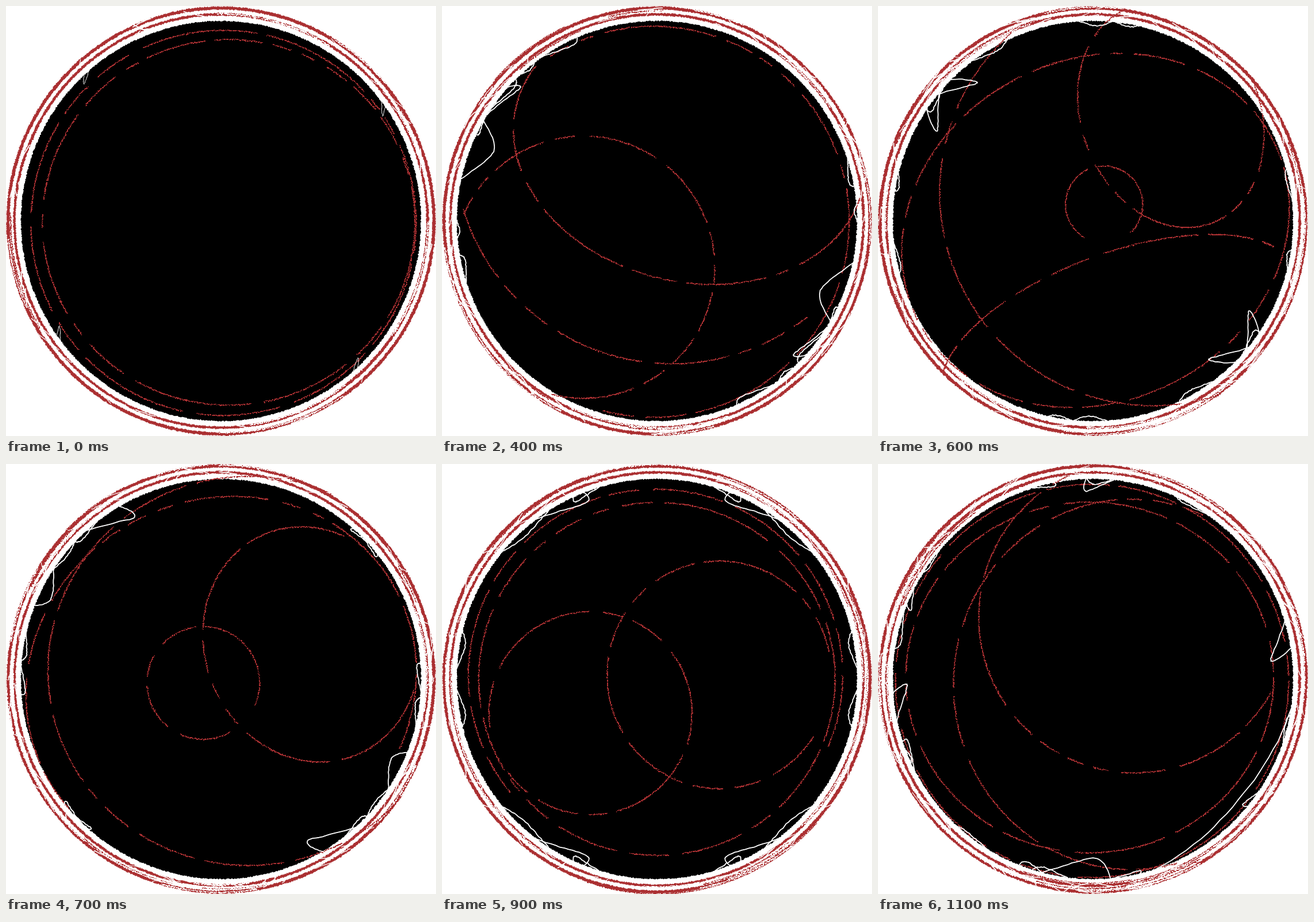
Write an HTML page with a canvas that moves like this. It is 748 px wide and 748 px high and loops after 1200 ms.

```html
<!DOCTYPE html>
<html>
<head>
<meta charset="utf-8">
<style>
html, body { margin: 0; width: 100%; height: 100%; overflow: hidden; background: #fff; }
canvas { display: block; width: 748px; height: 748px; }
</style>
</head>
<body>
<canvas id="c" width="748" height="748"></canvas>
<script>
const ctx = document.getElementById('c').getContext('2d');
const MID = 374, RIM = 348, STEP = 100, COUNT = 12, CARRIED = 4, RAD = Math.PI / 180;
const RED = '#ab3032', WHITE = '#fff';

// Ellipse whose y phase is shifted by skew; angles in degrees.
const ring = (x, y, rx, ry = rx, skew = 0, from = 0, to = 360) => [x, y, rx, ry, skew, from, to];
const circle = (x, y, r, from, to) => ring(x, y, r, r, 0, from, to);
// White outline growing inwards from the rim: angle, half width, depth, lean of the tip.
const petal = (angle, half, depth, lean) => [angle, half, depth, lean];

const scenes = [
  { step: 0, sym: 'turn', wear: 0.3, rings: [
    circle(378, 377, 335), ring(387, 376, 324, 318)
  ], petals: [petal(228, 1, 12, -3), petal(144, 1, 14, 3)] },

  { step: 2, sym: 'turn', wear: 0.8, rings: [
    circle(369, 322, 272), circle(354, 441, 262), ring(365, 397, 338, 312, -2.4)
  ], petals: [petal(222, 9, 7, 0), petal(173, 8, 6, 0)] },

  { step: 4, sym: 'turn', wear: 0.8, rings: [
    ring(430, 246, 306, 238, 7.5, 14, 209), circle(246, 454, 228, 204, 464),
    circle(400, 242, 380, 52, 163), circle(368, 375, 340, 238, 465)
  ], petals: [petal(217, 5, 17, 7), petal(201, 9, 40, 2)] },

  { step: 6, sym: 'turn', wear: 0.8, rings: [
    ring(509, 190, 162, 195, 10, -30, 240), circle(393, 345, 67, 122, 407),
    circle(478, 324, 371, 70, 229), ring(378, 390, 337, 308, -7), ring(420, 570, 310, 173, -31, 189, 330)
  ], petals: [petal(222, 3, 36, 8), petal(217, 3, 36, -7)] },

  { step: 8, sym: 'mirror', wear: 0.7, rings: [
    circle(551, 437, 214, 66, 336), circle(293, 416, 129), ring(366, 395, 328, 306),
    circle(370, 372, 342, 282, 408), circle(-540, 830, 739, 320, 349)
  ], petals: [petal(245, 9, 24, 8), petal(198, 9, 8, 3)] },

  { step: 10, sym: 'flip', wear: 1, rings: [
    ring(413, 296, 176, 182), circle(223, 450, 224, 344, 649), ring(381, 352, 292, 308),
    ring(372, 362, 309, 305), circle(358, 375, 340, 41, 107), circle(436, 338, 312, 24, 83)
  ], petals: [petal(236, 7, 14, 6), petal(259, 9, 14, -5)] },

  { step: 11, sym: 'none', wear: 1, rings: [
    circle(446, 266, 271, 29, 245), ring(440, 383, 309, 322, 0, 75, 295),
    ring(368, 371, 320, 305), circle(372, 377, 342)
  ], petals: [petal(272, 4, 22, -4), petal(347, 4, 38, 7), petal(40, 32, 20, 0), petal(95, 10, 38, -5), petal(172, 4, 26, 6)] }
];

const SYMMETRY = {
  none: [[1, 1]],
  turn: [[1, 1], [-1, -1]],
  flip: [[1, 1], [-1, 1]],
  mirror: [[1, 1], [-1, 1], [1, -1], [-1, -1]]
};

function seeded(n) {
  let s = n * 7919 + 17;
  return () => {
    s = s + 0x6D2B79F5 | 0;
    let t = Math.imul(s ^ s >>> 15, 1 | s);
    t = t + Math.imul(t ^ t >>> 7, 61 | t) ^ t;
    return ((t ^ t >>> 14) >>> 0) / 4294967296;
  };
}

function roughLoop(r, rnd) {
  const n = Math.round(r * 5);
  for (let i = 0; i < n; i++) {
    const a = i / n * 2 * Math.PI, d = r + (rnd() - 0.5) * 2;
    ctx[i ? 'lineTo' : 'moveTo'](MID + d * Math.cos(a), MID + d * Math.sin(a));
  }
  ctx.closePath();
}

function band(r, w, rnd) {
  ctx.beginPath();
  roughLoop(r + w / 2, rnd);
  roughLoop(r - w / 2, rnd);
  ctx.fillStyle = RED;
  ctx.fill('evenodd');
}

// Grainy line made of small dots
function grain([x, y, rx, ry, skew], from, to, color, rnd) {
  const n = Math.ceil((to - from) * RAD * Math.max(rx, ry));
  ctx.fillStyle = color;
  for (let i = 0; i <= n; i++) {
    const t = (from + (to - from) * i / n) * RAD;
    const px = x + rx * Math.cos(t) + (rnd() - 0.5) * 1.6;
    const py = y + ry * Math.sin(t + skew * RAD) + (rnd() - 0.5) * 1.6;
    ctx.fillRect(Math.floor(px), Math.floor(py), rnd() < 0.5 ? 2 : 1, rnd() < 0.5 ? 2 : 1);
  }
}

function dashed(shape, rnd) {
  const [, , rx, ry, , from, to] = shape;
  const degrees = px => px / Math.max(rx, ry) / RAD;
  let a = from;
  while (a < to) {
    const end = Math.min(to, a + degrees(20 + 190 * rnd() ** 1.5));
    grain(shape, a, end, RED, rnd);
    a = end + degrees(16 + 12 * rnd());
  }
}

// Broken lines that run along the double border
function streaks(count, color, rnd) {
  for (let i = 0; i < count; i++) {
    const r = 358 + rnd() * 15, a = rnd() * 360;
    const x = MID + (rnd() - 0.5) * 8, y = MID + (rnd() - 0.5) * 8;
    grain(ring(x, y, r), a, a + 8 + rnd() * 30, color, rnd);
  }
}

function repeated(sym, draw) {
  for (const [sx, sy] of SYMMETRY[sym]) {
    ctx.save();
    ctx.translate(MID, MID);
    ctx.scale(sx, sy);
    ctx.translate(-MID, -MID);
    draw();
    ctx.restore();
  }
}

// Strokes a curve given as t -> [angle, radius], with a slight tremble.
function polar(sym, n, at, rnd) {
  const path = new Path2D();
  for (let i = 0; i <= n; i++) {
    const [a, r] = at(i / n), d = r + (rnd() - 0.5) * 1.6;
    path.lineTo(MID + d * Math.cos(a * RAD), MID + d * Math.sin(a * RAD));
  }
  repeated(sym, () => ctx.stroke(path));
}

function drawPetal(sym, [angle, half, depth, lean], rnd) {
  polar(sym, 24, t => {
    const side = 2 * t - 1, rise = 1 - Math.abs(side) ** 1.7;
    return [angle + half * side + lean * rise, RIM + 1 - depth * rise];
  }, rnd);
}

function scratches(sym, wear, rnd) {
  const n = Math.round(120 * wear / SYMMETRY[sym].length);
  for (let i = 0; i < n; i++) {
    const a = rnd() * 360, len = 1 + rnd() * 6;
    const r0 = 354 + rnd() * 20, r1 = 354 + rnd() * 20;
    ctx.lineWidth = 1 + rnd() * 0.8;
    polar(sym, 5, t => [a + len * t, r0 + (r1 - r0) * t], rnd);
  }
}

function fringe(sym, wear, rnd) {
  const n = Math.round(14 * wear / SYMMETRY[sym].length);
  for (let i = 0; i < n; i++)
    drawPetal(sym, petal(rnd() * 360, 2 + rnd() * 4, 4 + rnd() * 7, rnd() * 8 - 4), rnd);
}

// Shapes that carry over to the next scene move there in a straight line.
const blend = (a, b, k) => a.slice(0, Math.min(b.length, CARRIED))
  .map((shape, i) => shape.map((v, j) => v + (b[i][j] - v) * k));

function pose(step) {
  const at = scenes.findLastIndex(s => s.step <= step);
  const now = scenes[at], next = scenes[at + 1];
  if (now.step === step) return now;
  const k = (step - now.step) / (next.step - now.step);
  return { ...now, rings: blend(now.rings, next.rings, k), petals: blend(now.petals, next.petals, k) };
}

function paint(step) {
  const rnd = seeded(step + 1);
  const { sym, wear, rings, petals } = pose(step);

  ctx.fillStyle = WHITE;
  ctx.fillRect(0, 0, 748, 748);
  ctx.fillStyle = '#000';
  ctx.beginPath();
  roughLoop(RIM, rnd);
  ctx.fill();
  band(370.5, 5.5, rnd);
  band(359.5, 4.5, rnd);

  ctx.save();
  ctx.beginPath();
  ctx.arc(MID, MID, 375, 0, 2 * Math.PI);
  ctx.clip();
  streaks(8, RED, rnd);
  streaks(10 + 14 * wear, WHITE, rnd);
  ctx.strokeStyle = WHITE;
  ctx.lineCap = ctx.lineJoin = 'round';
  scratches(sym, wear, rnd);
  for (const shape of rings) dashed(shape, rnd);
  ctx.lineWidth = step < 2 ? 1 : 1.8;
  if (step > 1) fringe(sym, wear, rnd);
  for (const p of petals) drawPetal(sym, p, rnd);
  ctx.restore();
}

let shown = -1;
const start = performance.now();
function tick() {
  const step = Math.floor((performance.now() - start) / STEP) % COUNT;
  if (step !== shown) paint(shown = step);
  requestAnimationFrame(tick);
}
tick();
</script>
</body>
</html>
```
